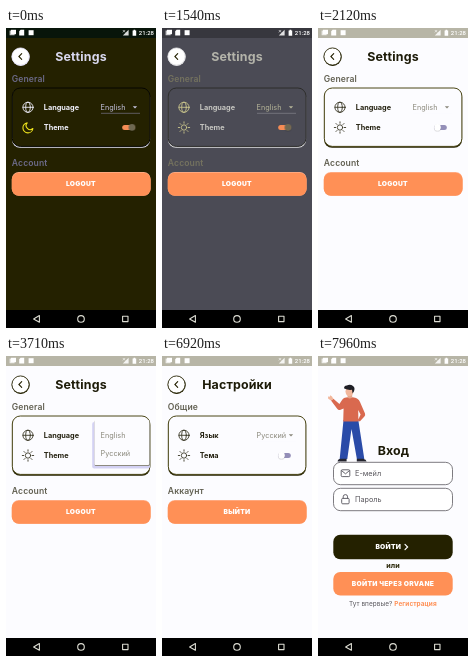
An HTML page for the animation above (8000 ms loop, 150 px wide and 300 px high).

```html
<!DOCTYPE html>
<html lang="en">
<head>
<meta charset="utf-8">
<title>App settings</title>
<style>
@property --bg { syntax: "<color>"; inherits: true; initial-value: #242100; }
@property --bar { syntax: "<color>"; inherits: true; initial-value: #08150a; }
@property --fg { syntax: "<color>"; inherits: true; initial-value: #d9d8ee; }
@property --label { syntax: "<color>"; inherits: true; initial-value: #f4f4ff; }
@property --muted { syntax: "<color>"; inherits: true; initial-value: #6c6a88; }
@property --value { syntax: "<color>"; inherits: true; initial-value: #c4c2dc; }
@property --edge { syntax: "<color>"; inherits: true; initial-value: #050500; }
@property --drop { syntax: "<color>"; inherits: true; initial-value: #e4e2f6; }
@property --line { syntax: "<color>"; inherits: true; initial-value: #77758a; }
@property --icon { syntax: "<color>"; inherits: true; initial-value: #ecebf6; }

html, body { margin: 0; width: 100%; height: 100%; overflow: hidden; background: #000; }
svg { display: block; width: 100vw; height: 100vh; animation: theme 8s linear infinite; }
text { font-family: Inter, "Open Sans", sans-serif; font-weight: 700; }
.mid { text-anchor: middle; }
.title { font-size: 12.4px; letter-spacing: .15px; fill: var(--fg); }
.section { font-size: 8.6px; font-weight: 600; letter-spacing: .1px; fill: var(--muted); }
.row { font-size: 7.3px; fill: var(--label); }
.value { font-size: 7.3px; font-weight: 400; fill: var(--value); }
.btn { font-size: 6.7px; font-weight: 900; letter-spacing: .25px; fill: #fff; }
.plain { font-weight: 400; fill: #58565c; }
.stroke { fill: none; stroke: var(--icon); stroke-width: .9; stroke-linecap: round; stroke-linejoin: round; }

.night { animation: until-day 8s step-end infinite; }
.day { animation: from-day 8s step-end infinite; }
.en { animation: until-ru 8s step-end infinite; }
.ru { animation: from-ru 8s step-end infinite; }
.track { animation: track 8s linear infinite; }
.thumb { animation: thumb 8s ease-in-out infinite; }
.menu { animation: menu 8s ease-out infinite; }
.login { animation: login 8s ease-out infinite; }

@keyframes theme {
  0%, 18.25% {
    --bg: #242100; --bar: #08150a; --fg: #d9d8ee; --label: #f4f4ff; --muted: #6c6a88;
    --value: #c4c2dc; --edge: #050500; --drop: #e4e2f6; --line: #77758a; --icon: #ecebf6;
  }
  19.25% {
    --bg: #4a4a54; --bar: #37373e; --fg: #b4b4ab; --label: #c9c9c4; --muted: #74725f;
    --value: #b5b498; --edge: #2c2c2a; --drop: #e0e0e2; --line: #85858c; --icon: #c9c48c;
  }
  23.25%, 100% {
    --bg: #fcfcff; --bar: #b7b5a6; --fg: #1d1b08; --label: #242110; --muted: #626052;
    --value: #8b897c; --edge: #4a4616; --drop: #242100; --line: #fcfcff; --icon: #3a3826;
  }
}
@keyframes until-day { 0% { opacity: 1; } 18.75%, 100% { opacity: 0; } }
@keyframes from-day { 0% { opacity: 0; } 18.75%, 100% { opacity: 1; } }
@keyframes until-ru { 0% { opacity: 1; } 53.75%, 100% { opacity: 0; } }
@keyframes from-ru { 0% { opacity: 0; } 53.75%, 100% { opacity: 1; } }
@keyframes track { 0%, 20% { fill: #f58c55; } 22.5%, 100% { fill: #948fb8; } }
@keyframes thumb {
  0%, 20% { transform: translateX(6.5px); fill: #6e6852; }
  22.5%, 100% { transform: none; fill: #fff; }
}
@keyframes menu {
  0%, 41.25% { opacity: 0; clip-path: inset(0 0 50% 0); }
  42.25% { opacity: 1; clip-path: inset(0 0 50% 0); }
  44.5%, 53% { opacity: 1; clip-path: inset(0); }
  55%, 100% { opacity: 0; clip-path: inset(0); }
}
@keyframes login { 0%, 93% { opacity: 0; } 96%, 100% { opacity: 1; } }
</style>
</head>
<body>
<svg viewBox="0 0 150 300" preserveAspectRatio="none">
  <rect width="150" height="300" fill="var(--bg)"/>

  <!-- settings -->
  <circle cx="14.7" cy="29" r="9" fill="var(--drop)"/>
  <circle cx="14.5" cy="28.5" r="8.6" fill="#fff" stroke="var(--drop)" stroke-width=".8"/>
  <path d="M15.7 25.7l-2.8 2.8 2.8 2.8" fill="none" stroke="#242100" stroke-width="1.1" stroke-linecap="round"/>

  <rect x="6.1" y="61" width="138" height="58.8" rx="8" fill="var(--drop)"/>
  <rect x="6.3" y="60" width="137.6" height="58.4" rx="8" fill="var(--bg)" stroke="var(--edge)"/>

  <g class="stroke">
    <circle cx="22" cy="79.3" r="5.1"/>
    <ellipse cx="22" cy="79.3" rx="2.3" ry="5.1"/>
    <path d="M16.9 79.3h10.2"/>
  </g>
  <path class="night" d="M21.2 94.9a5 5 0 1 0 5.7 5.6a4 4 0 0 1-5.7-5.6z" fill="none" stroke="#eee31c" stroke-width="1.1" stroke-linejoin="round"/>
  <g class="day">
    <g class="stroke">
      <circle cx="22" cy="99.5" r="2.7"/>
      <path d="M22 93.8v1.4M22 103.8v1.4M16.3 99.5h1.4M26.3 99.5h1.4M18 95.5l1 1M25 102.5l1 1M18 103.5l1-1M25 96.5l1-1"/>
    </g>
  </g>

  <path d="M95 85.3h39" stroke="var(--line)" stroke-width=".7"/>
  <path d="M126.8 78.2h4.4l-2.2 2.3z" fill="var(--value)"/>
  <rect class="track" x="116.2" y="96.9" width="12.6" height="5" rx="2.5"/>
  <g class="thumb">
    <circle cx="119.5" cy="99.9" r="3.6" fill="#000" fill-opacity=".14"/>
    <circle cx="119.5" cy="99.4" r="3.3"/>
  </g>

  <rect x="5.8" y="144" width="138.8" height="23.8" rx="7" fill="#ffb08c"/>
  <rect x="5.8" y="144.8" width="138.8" height="23" rx="7" fill="#ff9056"/>

  <g class="en">
    <text class="title mid" x="75" y="32.8">Settings</text>
    <text class="section" x="5.8" y="53.8">General</text>
    <text class="row" x="37.8" y="81.6">Language</text>
    <text class="row" x="37.8" y="101.9">Theme</text>
    <text class="value" x="94.6" y="81.6">English</text>
    <text class="section" x="5.8" y="138.2">Account</text>
    <text class="btn mid" x="75" y="158.4">LOGOUT</text>
  </g>
  <g class="ru">
    <text class="title mid" x="75" y="32.8">Настройки</text>
    <text class="section" x="5.8" y="53.8">Общие</text>
    <text class="row" x="37.8" y="81.6">Язык</text>
    <text class="row" x="37.8" y="101.9">Тема</text>
    <text class="value" x="94.6" y="81.6">Русский</text>
    <text class="section" x="5.8" y="138.2">Аккаунт</text>
    <text class="btn mid" x="75" y="158.4">ВЫЙТИ</text>
  </g>

  <g class="menu">
    <rect x="86.2" y="66" width="57.8" height="46.4" rx="2" fill="#d3d1f3"/>
    <rect x="88.6" y="64.5" width="55.2" height="45.3" rx="1" fill="#77745a"/>
    <rect x="88.4" y="64" width="54.8" height="45" rx="1" fill="#fcfcff"/>
    <text class="value" x="94.6" y="81.6">English</text>
    <text class="value" x="94.6" y="100.4">Русский</text>
  </g>

  <!-- sign in -->
  <g class="login">
    <rect y="10" width="150" height="272" fill="#fcfcff"/>

    <path d="M25.5 64h14.8l6 39h-7.4l-5.4-30-4.2 30h-7.6z" fill="#2a4ba8"/>
    <path d="M19.6 105.6q.4-2.8 3-2.8h6v2.8zM38.8 105.6v-2.8h6.4q3 .4 3.4 2.8z" fill="#25252f"/>
    <path d="M28 41.6q4-1.4 8 0 4.4.6 6 4.4l5 11.6q.6 1.8-.6 3l-4.6 5-1.8-1.4 2.6-5.8-2.4-4.4.2 11.6H25.2l.4-13-3.6 1.4q-1.8.4-2.8-1.2l-6.2-8.4 2.4-1.6 6 5.2 3-4.4q1.4-1.8 3.6-2z" fill="#d9694f"/>
    <path d="M13 44.6l-2.8-1.8-.2-2.4 1.8.4.4-1.6 1.8 1.2 1.4 2.6z" fill="#f2b79c"/>
    <path d="M29.6 37h4.6v4.6q-2.4 2-4.6 0z" fill="#e5a58a"/>
    <ellipse cx="31.4" cy="35.6" rx="3.9" ry="4.7" fill="#f2b79c"/>
    <path d="M26.2 32.6q-.6-3 2.6-3.2 3.6-1.4 6.2.6 2.4 1.6 1 5.2l-1.4 2.2-.6-3.6q-4 .6-7.8-1.2z" fill="#1f1f26"/>

    <text class="title mid" x="75.4" y="99.3" font-size="12.8">Вход</text>

    <g fill="#fff" stroke="#6f6c72" stroke-width=".9">
      <rect x="15.5" y="106.3" width="119" height="22.4" rx="7"/>
      <rect x="15.5" y="132.3" width="119" height="22.4" rx="7"/>
    </g>
    <g fill="none" stroke="#55535c" stroke-width=".9" stroke-linejoin="round">
      <rect x="23.2" y="113.8" width="8.6" height="6.8" rx="1"/>
      <path d="M23.5 114.6l4 3.2 4-3.2"/>
      <rect x="23.7" y="142.4" width="7.4" height="5.4" rx="1"/>
      <path d="M25.2 142.4v-1.6a2.2 2.2 0 0 1 4.4 0v1.6"/>
    </g>
    <g font-size="7.3">
      <text class="plain" x="37" y="119.9">Е-мейл</text>
      <text class="plain" x="37" y="146.3">Пароль</text>
    </g>

    <rect x="15.3" y="178.7" width="119.4" height="24.6" rx="7" fill="#242100"/>
    <text class="btn mid" x="70.3" y="193.4">ВОЙТИ</text>
    <path d="M87 188.4l2.6 2.6-2.6 2.6" fill="none" stroke="#fff" stroke-width="1.2" stroke-linecap="round"/>
    <text class="mid" x="75" y="212.2" font-size="7.2" fill="#242100">или</text>
    <rect x="15.3" y="216" width="119.4" height="23.6" rx="7" fill="#ff9056"/>
    <text class="btn mid" x="75" y="230.1">ВОЙТИ ЧЕРЕЗ ORVANE</text>
    <g font-size="6.4" letter-spacing=".08">
      <text class="plain mid" x="74.8" y="250.2">Тут впервые? <tspan fill="#ff9056" font-weight="700">Регистрация</tspan></text>
    </g>
  </g>

  <!-- system bars -->
  <rect width="150" height="10" fill="var(--bar)"/>
  <g fill="#fff">
    <path d="M3.6 2.6h5v4.6h-5z" fill-opacity=".75"/>
    <path d="M5 1.8h5v4.4H5z"/>
    <path d="M14.6 1.8h3.6v5.8h-5V3.2z"/>
    <rect x="22.6" y="2.2" width="5" height="5"/>
    <path d="M122.6 1.8v5.8h-5.8z" fill-opacity=".85"/>
    <path d="M126.6 2.4h1V1.7h1.6v.7h1v5.4h-3.6z"/>
    <text x="132.8" y="7.2" style="font:500 6px Roboto,sans-serif">21:28</text>
  </g>
  <path d="M116.8 2l2.4 2.4m0-2.4l-2.4 2.4" stroke="#fff" stroke-width=".6"/>
  <rect y="282" width="150" height="18" fill="#000"/>
  <g fill="none" stroke="#dcdcd2" stroke-width="1.1" stroke-linejoin="round">
    <path d="M33.4 287.6v6.6l-5.8-3.3z"/>
    <circle cx="75" cy="290.9" r="3.3"/>
    <rect x="116.6" y="288.2" width="5.4" height="5.4"/>
  </g>
</svg>
</body>
</html>
```
